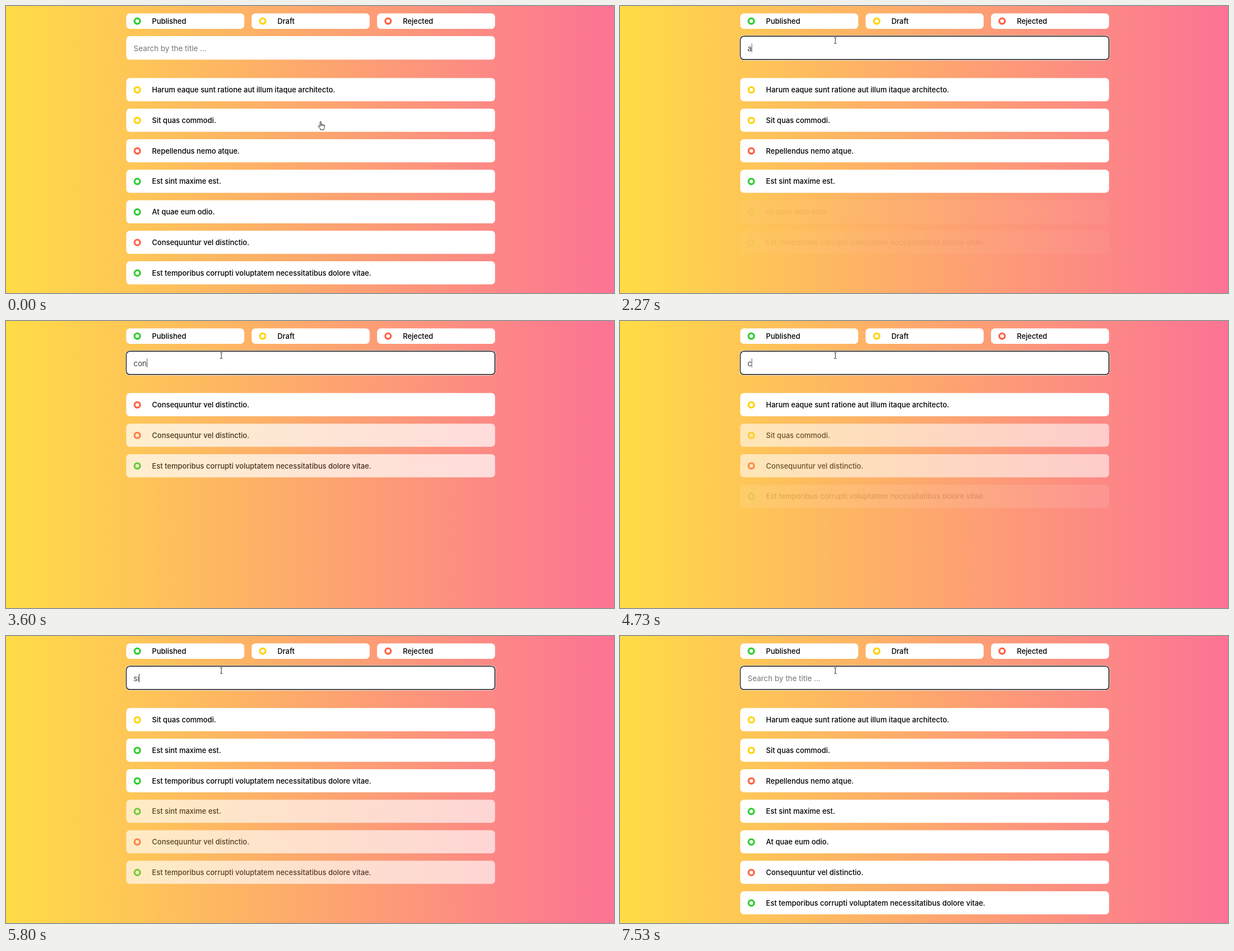
Write an HTML page that moves like this. It is 1088 px wide and 515 px high and loops after 8.07 s.

```html
<!DOCTYPE html>
<html lang="en">
<head>
<meta charset="utf-8">
<title>Filtered list</title>
<style>
  html, body { margin: 0; width: 100%; height: 100%; overflow: hidden; }
  body { position: relative; background: linear-gradient(to right, #ffdc46, #fc7395); }
  #page {
    position: absolute; left: 0; top: 0; width: 1648px; height: 780px;
    transform: scale(.66); transform-origin: 0 0;
    font: 500 19.65px Inter, sans-serif; color: #000;
  }
  .card {
    position: absolute; left: 326px; width: 1000px; height: 63px;
    box-sizing: border-box; padding-left: 20px;
    display: flex; align-items: center;
    background: #fff; border-radius: 10px; white-space: pre;
  }
  .ring {
    width: 20px; height: 20px; margin-right: 30px; box-sizing: border-box;
    border: 5px solid; border-radius: 50%;
  }
  .legend { top: 20px; width: 320px; height: 42px; }
  #search { top: 82px; height: 64px; font-size: 20.4px; font-weight: 300; }
  #search.focused { box-shadow: inset 0 0 0 1.5px #101010, 0 0 0 1px #101010, 0 0 0 2px #fff; }
  #search.empty #query { color: #757575; font-weight: 400; }
  #caret { position: absolute; top: 20px; width: 1px; height: 24px; background: #000; }
  #pointer { position: absolute; left: 0; top: 0; width: 20px; height: 20px; overflow: visible; }
  #pointer path { fill: #fff; stroke: #111; stroke-width: .9; stroke-linejoin: round; }
  #pointer #beam { fill: none; }
</style>
</head>
<body>
<div id="page">
  <div id="search" class="card"><span id="query"></span><i id="caret"></i></div>
</div>
<svg id="pointer">
  <path id="hand" d="M-1 7.5V.8Q-1-.3 0-.3T1 .8V5Q2.7 4.3 3.2 5.4 4.8 4.8 5.3 6 7 5.7 7 7.3V10Q7 12 5.7 13.2V14.7H-.3V13.2L-4 8.7Q-4.5 7.5-3.4 7.2-2.5 7-1 8.8ZM1 5V7.6M3.2 5.4V7.8M5.3 6V8"/>
  <path id="arrow" d="M0 0V13L3 10.3 5 15 7 14.1 5 9.6H9Z"/>
  <path id="beam" d="M-2.2-5.5Q0-5.5 0-4.3 0-5.5 2.2-5.5M0-4.3V4.3M-2.2 5.5Q0 5.5 0 4.3 0 5.5 2.2 5.5"/>
</svg>
<script>
const LOOP = 8070, FADE = 250, FOCUS = 525, CARET_ON = 545;
const COLORS = { Published: '#32cd32', Draft: '#ffd30c', Rejected: '#ff6347' };
const POSTS = [
  ['Draft', 'Harum eaque sunt ratione aut illum itaque architecto.'],
  ['Draft', 'Sit quas commodi.'],
  ['Rejected', 'Repellendus nemo atque.'],
  ['Published', 'Est sint maxime est.'],
  ['Published', 'At quae eum odio.'],
  ['Rejected', 'Consequuntur vel distinctio.'],
  ['Published', 'Est temporibus corrupti voluptatem necessitatibus dolore vitae.']
];
const EDITS = [
  [-FADE, ''], [1265, 'a'], [1725, 'at'], [2260, 'a'], [2445, ''],
  [2995, 'c'], [3265, 'co'], [3528, 'con'], [4588, 'co'], [4705, 'c'], [4900, ''],
  [5395, 's'], [5715, 'si'], [5940, 'sit'], [6465, 'si'], [6700, 's'], [6960, '']
].map(([time, text]) => ({
  time, text, posts: POSTS.filter(([, title]) => title.toLowerCase().includes(text))
}));

const $ = id => document.getElementById(id);
const clamp = x => Math.min(1, Math.max(0, x));
const mix = (a, b, p) => a + (b - a) * p;

function addCard(className) {
  const card = document.createElement('div');
  card.className = 'card ' + className;
  card.innerHTML = '<i class="ring"></i><span></span>';
  $('page').append(card);
  return card;
}

function fill(card, [status, title]) {
  card.firstChild.style.color = COLORS[status];
  card.lastChild.textContent = title;
}

Object.keys(COLORS).forEach((status, i) => {
  const card = addCard('legend');
  card.style.left = 326 + i * 340 + 'px';
  fill(card, [status, status]);
});
const rows = POSTS.map((_, i) => {
  const row = addCard('row');
  row.style.top = 196 + i * 83 + 'px';
  return row;
});

// Rows are keyed by position: a leaving row keeps its last content while it fades.
function drawRow(row, i, t, history) {
  let visible = true, since = -FADE, post = POSTS[i];
  for (const { time, posts } of history) {
    const present = i < posts.length;
    if (present !== visible) { visible = present; since = time; }
    if (present) post = posts[i];
  }
  const p = clamp((t - since) / FADE);
  fill(row, post);
  row.style.opacity = visible ? p : 1 - p;
}

function drawSearch(t, edit) {
  const focused = t >= FOCUS;
  $('search').className = 'card' + (focused ? ' focused' : '') + (edit.text ? '' : ' empty');
  $('query').textContent = edit.text || 'Search by the title ...';
  $('caret').style.left = 20 + (edit.text ? $('query').offsetWidth : 0) + 'px';
  const lastInput = Math.max(FOCUS, edit.time);
  $('caret').style.display = focused && t - lastInput < CARET_ON ? '' : 'none';
}

function drawPointer(t) {
  const p = clamp((t - 30) / 440), eased = p * p * (3 - 2 * p);
  const x = mix(563, 386.4, eased) - 1.1 * clamp((t - 760) / 110);
  const y = mix(207.5, 62, eased);
  const overRow = y > 129.4 && (y - 129.4) % 54.8 < 41.6;
  const shape = y < 96.5 ? 'beam' : overRow ? 'hand' : 'arrow';
  for (const id of ['hand', 'arrow', 'beam']) $(id).style.display = id === shape ? '' : 'none';
  $('pointer').style.transform = `translate(${x}px, ${y}px)`;
}

function render(t) {
  const history = EDITS.filter(edit => edit.time <= t);
  rows.forEach((row, i) => drawRow(row, i, t, history));
  drawSearch(t, history[history.length - 1]);
  drawPointer(t);
}

const start = performance.now();
function tick() {
  render((performance.now() - start) % LOOP);
  requestAnimationFrame(tick);
}
tick();
</script>
</body>
</html>
```
